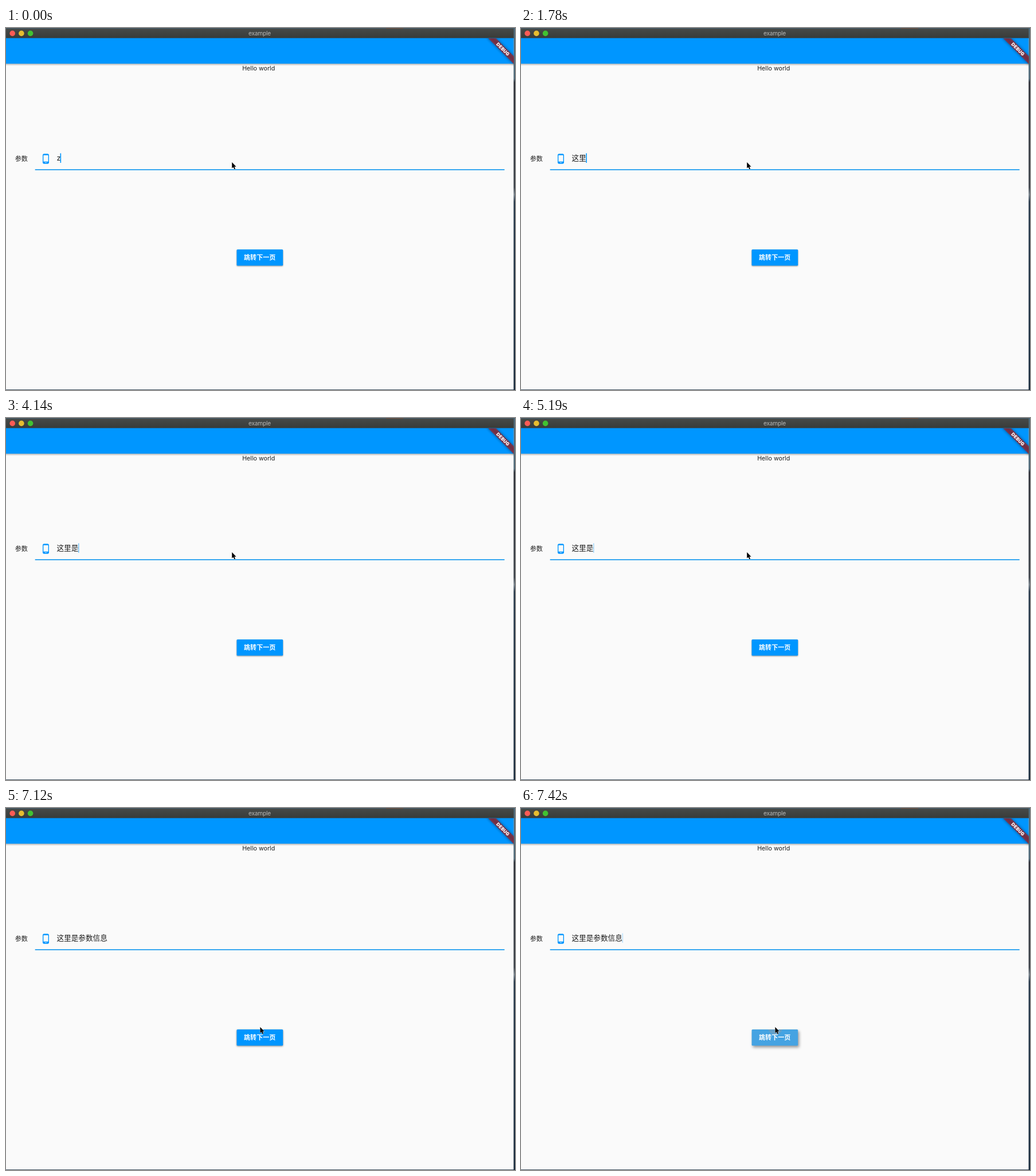
These frames come from a looping animation (888x631 px, 8 s). An HTML page:

```html
<!DOCTYPE html>
<html lang="zh-CN">
<head>
<meta charset="utf-8">
<title>example</title>
<style>
html, body { margin: 0; width: 100%; height: 100%; overflow: hidden; background: #fafafa; }
svg { display: block; }
text { font-family: Inter, "Noto Sans CJK SC", "Noto Sans CJK", sans-serif; fill: #1c1c1c; }
.mid { text-anchor: middle; }
</style>
</head>
<body>
<svg width="888" height="631" viewBox="0 0 888 631">
  <defs>
    <linearGradient id="title" x2="0" y2="1">
      <stop stop-color="#474b49"/><stop offset="1" stop-color="#383b39"/>
    </linearGradient>
    <linearGradient id="shade" x2="0" y2="1">
      <stop stop-color="#000" stop-opacity=".28"/><stop offset="1" stop-color="#000" stop-opacity="0"/>
    </linearGradient>
    <linearGradient id="desk" x2="0" y2="1">
      <stop stop-color="#4d6878"/><stop offset=".14" stop-color="#4d6878"/>
      <stop offset=".15" stop-color="#2b2e36"/><stop offset=".44" stop-color="#3a4048"/>
      <stop offset=".46" stop-color="#75808a"/><stop offset=".48" stop-color="#26384a"/>
      <stop offset="1" stop-color="#182b3d"/>
    </linearGradient>
    <filter id="blur" x="-30%" y="-200%" width="160%" height="500%"><feGaussianBlur stdDeviation="2.6"/></filter>
    <clipPath id="app"><rect y="18" width="886" height="612"/></clipPath>
    <clipPath id="face"><rect x="402.5" y="386" width="80.7" height="28.3" rx="1.6"/></clipPath>
  </defs>

  <!-- window -->
  <rect width="888" height="631" fill="url(#desk)"/>
  <rect y="18" width="885.6" height="612.2" fill="#fafafa"/>
  <rect width="885.6" height="18" fill="url(#title)"/>
  <rect width="888" height="1" fill="#456071"/>
  <rect x="663" width="30" height="1" fill="#705448"/>
  <circle cx="11.2" cy="9.4" r="4.8" fill="#fc5b55"/>
  <circle cx="26.9" cy="9.4" r="4.8" fill="#e6bd30"/>
  <circle cx="42.6" cy="9.4" r="4.8" fill="#41c232"/>
  <text class="mid" x="442.5" y="13.2" font-size="10.2" letter-spacing="-.2" style="fill:#b8bab9">example</text>
  <rect y="62" width="885.6" height="4" fill="url(#shade)"/>
  <rect y="17.6" width="885.6" height="44.6" fill="#0096ff"/>

  <!-- corner ribbon -->
  <g clip-path="url(#app)">
    <g transform="translate(886 18) rotate(45)">
      <rect x="-34" y="22.1" width="68" height="9.5" opacity=".5" filter="url(#blur)"/>
      <rect x="-34" y="22.1" width="68" height="9.5" fill="#b71c1c" fill-opacity=".63"/>
      <text class="mid" y="29.7" font-size="8" font-weight="900" letter-spacing=".2" style="fill:#fff">DEBUG</text>
    </g>
  </g>

  <text class="mid" x="440.7" y="73.6" font-size="10.7">Hello world</text>

  <!-- input -->
  <text x="15.7" y="232.2" font-size="11.1">参数</text>
  <path transform="translate(60 218.5) scale(.79)" fill="#0096ff" d="M16 1H8C6.34 1 5 2.34 5 4v16c0 1.66 1.34 3 3 3h8c1.66 0 3-1.34 3-3V4c0-1.66-1.34-3-3-3zm-2 20h-4v-1h4v1zm3.25-3H6.75V4h10.5v14z"/>
  <rect x="50.7" y="246.2" width="819" height="1.6" fill="#0c95ee"/>
  <text id="entry" x="88.4" y="231" font-size="12.64"></text>
  <rect id="caret" y="218.4" width="1.6" height="16.6" fill="#0096ff"/>

  <!-- button -->
  <rect id="button" x="402.5" y="386" width="80.7" height="28.3" rx="1.6"/>
  <circle id="ripple" cx="443.6" cy="382" r="13" fill="#909ca4" fill-opacity=".4" clip-path="url(#face)"/>
  <text class="mid" x="442.7" y="404.3" font-size="11.06" font-weight="700" style="fill:#fff">跳转下一页</text>

  <path id="pointer" d="M0 0V10.6L2.4 8.4 4.1 12.2 5.9 11.4 4.2 7.7H7.4Z" stroke="#fff" stroke-width="1" paint-order="stroke"/>
</svg>
<script>
const LOOP = 8000;
const $ = id => document.getElementById(id);

// Each track lists [start time, value]; a value holds until the next one.
const typed = [[0, 'z'], [150, ''], [1780, '这里'], [2520, '这里是'], [5480, '这里是参数'], [6230, '这里是参数信息']];
const caretAlpha = [
  [0, 1], [300, .5], [450, 0], [890, .5], [1040, 1], [1330, .5], [1480, 0],
  [1780, 1], [3110, .9], [3260, .4], [3410, 0], [3700, .5], [3850, 1],
  [4140, .5], [4290, 0], [4590, .5], [4740, 1], [5190, .35], [5340, 0],
  [5480, 1], [6830, .4], [6970, 0], [7420, .25]
];
const travel = [[0, 0], [6680, .12], [6830, .55], [6970, .94], [7120, 1]];
const looks = [
  [0, { fill: '#0096ff', shadow: '0 1px 1px #0006', ripple: 0 }],
  [6970, { fill: '#0096ff', shadow: '0 1.5px 1.6px #0007', ripple: 0 }],
  [7270, { fill: '#239cf1', shadow: '1px 3px 2.5px #0006', ripple: .5 }],
  [7420, { fill: '#45a3e2', shadow: '2px 3.5px 2.5px #0006', ripple: 1 }]
];
const at = (track, t) => track.findLast(([start]) => start <= t)[1];

function draw(now) {
  const t = now % LOOP;
  const text = at(typed, t), look = at(looks, t), go = at(travel, t);
  $('entry').textContent = text;
  $('caret').setAttribute('x', 88 + (text === 'z' ? 6.5 : text.length * 12.64));
  $('caret').setAttribute('opacity', at(caretAlpha, t));
  $('button').setAttribute('fill', look.fill);
  $('button').style.filter = `drop-shadow(${look.shadow})`;
  $('ripple').setAttribute('opacity', look.ripple);
  $('pointer').setAttribute('transform', `translate(${394.2 + 49.2 * go} ${234 + 147.8 * go})`);
}

const begin = performance.now();
function tick() {
  draw(performance.now() - begin);
  requestAnimationFrame(tick);
}
tick();
</script>
</body>
</html>
```
